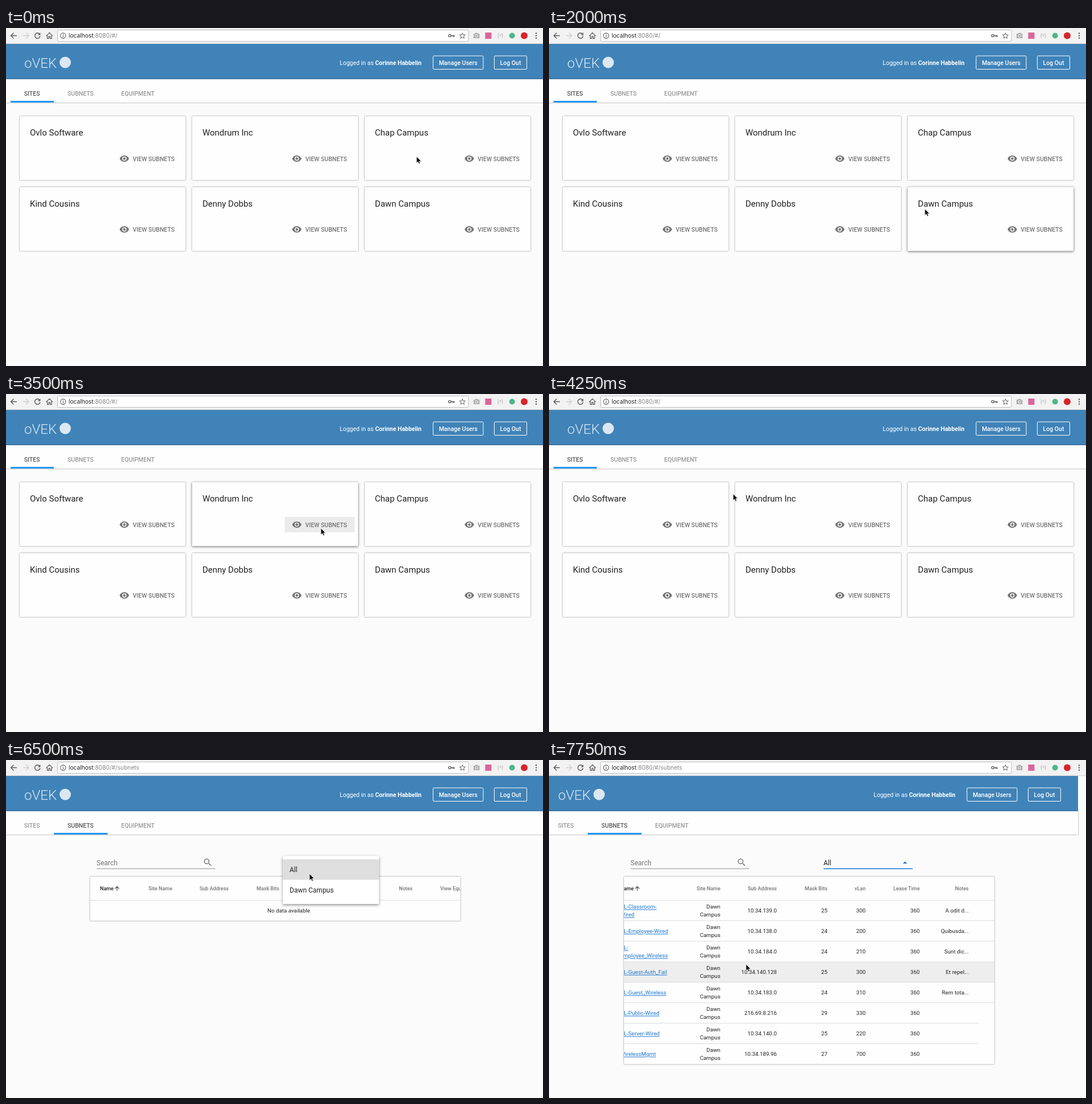
Write an HTML page that moves like this. It is 943 px wide and 594 px high and loops after 8000 ms.

```html
<!DOCTYPE html>
<html lang="en">
<head>
<meta charset="utf-8">
<title>Subnet manager</title>
<style>
  html, body { margin: 0; width: 100%; height: 100%; overflow: hidden; background: #fbfbfb; }
  svg { display: block; width: 943px; height: 594px; font-family: Roboto, sans-serif; }
  text { white-space: pre; }
  .url { font-family: Inter, sans-serif; }
  .mid { text-anchor: middle; }
  .end { text-anchor: end; }
  .med { font-weight: 500; }
  .dark { fill: #212121; }
  .grey { fill: #757575; }
  .white { fill: #fff; }
  .link { fill: #1976d2; text-decoration: underline; }
  .tab { fill: #999; font-weight: 500; }
  .tab.on { fill: #5a5a5a; }
  .tool { fill: none; stroke: #5a5a5a; stroke-width: 1.4; }
  .outline { fill: none; stroke: #fff; }
  .sheet { fill: #fefefe; filter: drop-shadow(0 .8px .8px rgba(0, 0, 0, .5)); }
  .up .sheet { filter: drop-shadow(0 1.3px 2.2px rgba(0, 0, 0, .6)); }
  .button { fill: none; }
  .button.on { fill: #ebebeb; }
  .row { fill: none; }
  .row.on { fill: #eee; }
  .option { fill: none; }
  .option.on { fill: #dedede; }
  #menu .sheet { fill: #fff; filter: drop-shadow(0 2px 2.4px rgba(0, 0, 0, .42)); }
  #field { fill: #757575; }
  #field line { stroke: #8c8c8c; }
  #field.set { fill: #1976d2; }
  #field.set text { fill: #212121; }
  #field.set line { stroke: #1976d2; stroke-width: 1.6; }
  #cursor { filter: drop-shadow(0 .6px .6px rgba(0, 0, 0, .35)); }
</style>
</head>
<body>
<svg id="stage" viewBox="0 0 943 594" xmlns="http://www.w3.org/2000/svg"></svg>
<script>
const LOOP = 8000, STEP = 250;
const EYE = 'M12 4.5C7 4.5 2.73 7.61 1 12c1.73 4.39 6 7.5 11 7.5s9.27-3.11 11-7.5c-1.73-4.39-6-7.5-11-7.5z' +
  'M12 17a5 5 0 1 1 0-10 5 5 0 0 1 0 10zm0-8a3 3 0 1 0 0 6 3 3 0 0 0 0-6z';
const LENS = 'M15.5 14h-.79l-.28-.27A6.5 6.5 0 1 0 13.73 14.43l.27.28v.79l5 4.99L20.49 19z' +
  'M9.5 14a4.5 4.5 0 1 1 0-9 4.5 4.5 0 0 1 0 9z';
const ARROW_UP = 'M4 12l1.41 1.41L11 7.83V20h2V7.83l5.58 5.59L20 12l-8-8-8 8z';

const sites = ['Ovlo Software', 'Wondrum Inc', 'Chap Campus', 'Kind Cousins', 'Denny Dobbs', 'Dawn Campus'];
const subnets = [
  ['CL-Classroom-|Wired', '10.34.139.0', 25, 300, 'A odit d...'],
  ['CL-Employee-Wired', '10.34.138.0', 24, 200, 'Quibusda...'],
  ['CL-|Employee_Wireless', '10.34.184.0', 24, 210, 'Sunt dic...'],
  ['CL-Guest-Auth_Fail', '10.34.140.128', 25, 300, 'Et repel...'],
  ['CL-Guest_Wireless', '10.34.183.0', 24, 310, 'Rem tota...'],
  ['CL-Public-Wired', '216.69.8.216', 29, 330, ''],
  ['CL-Server-Wired', '10.34.140.0', 25, 220, ''],
  ['WirelessMgmt', '10.34.189.96', 27, 700, '']
];
const heads = ['Site Name', 'Sub Address', 'Mask Bits', 'vLan', 'Lease Time', 'Notes'];
const emptyCols = [292, 391, 480, 547, 642, 714];
const dataCols = [341, 440, 529, 596, 691, 777];

// time, x, y of the pointer tip
const path = [
  [0, 721, 226], [500, 590, 222], [1000, 330, 250], [1250, 282, 262], [1500, 345, 305],
  [2000, 660, 318], [2500, 836, 246], [3000, 690, 232], [3250, 580, 235], [3500, 553, 236],
  [3750, 550, 235], [4500, 210, 146], [4750, 134, 119], [5000, 128, 118], [5250, 130, 120],
  [5750, 420, 250], [6000, 531, 184], [6500, 533, 200], [7000, 533, 200], [7500, 375, 340], [7750, 346, 359]
];

// Text whose capitals are centred on cy
const text = (x, cy, size, str, cls = '', rest = '') =>
  `<text x="${x}" y="${cy + size * .3555}" font-size="${size}" class="${cls}" ${rest}>${str}</text>`;
const rect = (x, y, w, h, rest = '') => `<rect x="${x}" y="${y}" width="${w}" height="${h}" ${rest}/>`;
const line = (x1, x2, y, rest = '') => `<line x1="${x1}" x2="${x2}" y1="${y}" y2="${y}" ${rest}/>`;
const icon = (d, x, y, k, cls) => `<path class="${cls}" fill-rule="evenodd" d="${d}" transform="translate(${x} ${y}) scale(${k})"/>`;
const lines = (x, cy, str, cls) => {
  const parts = str.split('|');
  return parts.map((p, i) => text(x, cy + 14 * i - 7 * (parts.length - 1), 9.75, p, cls)).join('');
};

const cardX = i => 24 + 302.9 * (i % 3);
const cardY = i => 155 + 124.4 * Math.floor(i / 3);

const toolbar = () => rect(0, 0, 943, 28, 'fill="#f2f2f2"') + line(0, 943, 27.5, 'stroke="#d4d4d4"') +
  rect(90.5, 3.5, 721.5, 20, 'rx="2" fill="#fff" stroke="#bdbdbd"') +
  `<g class="tool">
    <path d="M19 13.5H8.5M13.5 8.5l-5 5 5 5"/>
    <path d="M30 13.5h10M35 8.5l5 5-5 5" stroke="#d0d0d0"/>
    <path d="M59 10.6a4.7 4.7 0 1 0 .9 3.6"/><path d="M60.3 8v4.4h-4.4z" fill="#5a5a5a" stroke="none"/>
    <path d="M70.5 14.2L76.3 8.4l5.800 5.800M72.500 13v5.400h2.600v-3.600h2.400v3.600h2.600V13" stroke-width="1.200"/>
    <circle cx="100.300" cy="13.500" r="4.600" stroke-width="1.100"/>
    <path d="M100.300 12.700v3.300M100.300 10.700v1.200" stroke-width="1.200"/>
    <circle cx="779.300" cy="13.500" r="2.100"/><path d="M781.500 13.500h5.500v2.300M784.700 13.500v2" />
    <path d="M801.500 8.600l1.400 3.300 3.600.300-2.700 2.400.8 3.500-3.100-1.900-3.100 1.900.8-3.500-2.700-2.400 3.600-.300z" stroke-width="1"/>
  </g>
  <path d="M821 10h2.500l1-1.500h3.500l1 1.500h2.500v8H821z" fill="#b0b0b0"/>
  <circle cx="826.200" cy="13.900" r="2.300" fill="#b0b0b0" stroke="#f2f2f2"/>
  <rect x="841.500" y="8" width="11" height="11" fill="#d9659b"/>
  <circle cx="888.700" cy="13.500" r="5" fill="#4fb58a"/>
  <circle cx="910" cy="13.500" r="6" fill="#d8232a"/>
  <g fill="#5a5a5a"><circle cx="931" cy="9.300" r="1.200"/><circle cx="931" cy="13.500" r="1.200"/><circle cx="931" cy="17.700" r="1.200"/></g>` +
  text(868, 13.3, 8.5, '{=}', 'mid', 'fill="#aaa"') +
  text(110, 13.4, 10.2, 'localhost<tspan fill="#858585">:8080/#/<tspan id="route"></tspan></tspan>', 'url dark');

const header = () => rect(0, 28, 945, 62, 'fill="#4083b8"') +
  text(32, 61, 24, 'oVEK', '', 'fill="#dbe8f2" font-weight="300"') +
  '<circle cx="104" cy="60.500" r="10" fill="#dbe8f2"/>' +
  text(586, 61.5, 10.5, 'Logged in as <tspan font-weight="700">Corinne Habbelin</tspan>', 'white') +
  rect(750, 49, 88, 23.5, 'rx="1.5" class="outline"') + text(794, 61.5, 10.5, 'Manage Users', 'white med mid') +
  rect(857.5, 49, 57, 23.5, 'rx="1.5" class="outline"') + text(886, 61.5, 10.5, 'Log Out', 'white med mid');

const tabs = () => rect(0, 90, 945, 41, 'class="sheet"') +
  text(31.7, 115.3, 10.5, 'SITES', 'tab') + text(108, 115.3, 10.5, 'SUBNETS', 'tab') +
  text(202.3, 115.3, 10.5, 'EQUIPMENT', 'tab') + rect(8, 128, 76, 3, 'id="ink" fill="#2196f3"');

const card = (name, i) => {
  const x = cardX(i), y = cardY(i);
  return '<g class="card">' + rect(x, y, 291.3, 112.3, 'rx="1.5" class="sheet"') +
    rect(x + 162.5, y + 61, 123, 27, 'rx="1.5" class="button"') + text(x + 18, y + 29, 15, name, 'dark') +
    icon(EYE, x + 174.8, y + 65.5, .75, 'grey') + text(x + 198.5, y + 75, 10.5, 'VIEW SUBNETS', 'grey med') + '</g>';
};

const headRow = cols => text(165, 226, 9, 'Name', 'dark med') + icon(ARROW_UP, 189, 219.7, .5, 'dark') +
  heads.map((h, i) => text(cols[i], 226, 9, h, 'grey med end')).join('') +
  text(cols[5] + 48.5, 226, 9, 'View Equipment', 'grey med') + line(147, 900, 246.5, 'stroke="#dcdcdc"');

const dataRow = ([name, addr, mask, vlan, note], i) => {
  const y = 246.5 + 36 * i, cy = y + 18.5;
  const cells = [addr, mask, vlan, 360, note].map((c, k) => text(dataCols[k + 1], cy, 9.75, c, 'dark end')).join('');
  return rect(147, y, 753, 36, 'class="row"') + lines(165, cy, name, 'link') +
    lines(dataCols[0], cy, 'Dawn|Campus', 'dark end') + cells +
    (i < 7 ? line(147, i === 5 || i === 6 ? 795 : 900, y + 36, 'stroke="#dcdcdc"') : '');
};

const subnetView = () => text(159, 180.3, 12, 'Search', 'grey') + icon(LENS, 345.3, 171, .75, 'grey') +
  line(159, 367.5, 191, 'stroke="#8c8c8c"') +
  '<g id="field">' + text(498, 180.3, 12, 'Select') + line(498, 654.5, 191) + '<path/></g>' +
  rect(147.5, 205, 650.5, 77.5, 'id="table" rx="1.5" class="sheet"') +
  '<g clip-path="url(#inner)"><g id="empty">' + headRow(emptyCols) +
  text(496.5, 265, 9.75, 'No data available', 'dark mid') + '</g><g id="data">' +
  headRow(dataCols) + subnets.map(dataRow).join('') + '</g></g>' +
  '<g id="menu">' + rect(486, 168.5, 169, 84.5, 'rx="1.5" class="sheet"') +
  rect(486, 174.5, 169, 36, 'class="option"') + rect(486, 210.5, 169, 36, 'class="option"') +
  text(498, 192.7, 12, 'All', 'dark') + text(498, 229, 12, 'Dawn Campus', 'dark') + '</g>';

const stage = document.getElementById('stage');
stage.innerHTML = '<defs><clipPath id="inner">' + rect(147.5, 205, 650.5, 330) + '</clipPath></defs>' +
  '<g id="page">' + header() + tabs() + '<g id="sites">' + sites.map(card).join('') + '</g>' +
  '<g id="subnets">' + subnetView() + '</g></g>' + toolbar() +
  '<path id="cursor" d="M0 0V11.300l2.600-2.400 1.700 3.900 2-.9-1.700-3.700h3.500z" fill="#000" stroke="#fff" stroke-width=".8"/>';

const $ = id => document.getElementById(id);
const all = sel => [...stage.querySelectorAll(sel)];
const show = (id, on) => $(id).style.display = on ? '' : 'none';
const tabLabels = all('.tab'), cards = all('.card'), buttons = all('.button'), rows = all('.row'), options = all('.option');
const select = $('field').querySelector('text'), caret = $('field').querySelector('path');

function pointer(t) {
  const n = path.findIndex(p => p[0] > t);
  if (n < 0) return path[path.length - 1].slice(1);
  const [t0, x0, y0] = path[n - 1], [t1, x1, y1] = path[n], k = (t - t0) / (t1 - t0);
  return [x0 + (x1 - x0) * k, y0 + (y1 - y0) * k];
}

function draw(time) {
  const t = Math.floor(time / STEP) * STEP;
  const [px, py] = pointer(t);
  const over = (x, y, w, h) => t > 0 && px >= x && px < x + w && py >= y && py < y + h;
  const onSubnets = t >= 5000, loaded = t >= 7000;
  const shift = t >= 7500 ? -16 : 0, scroll = t >= 7750 ? -24 : 0;

  $('cursor').setAttribute('transform', `translate(${px} ${py})`);
  $('page').setAttribute('transform', `translate(${shift} 0)`);
  $('data').setAttribute('transform', `translate(${scroll} 0)`);
  $('route').textContent = onSubnets ? 'subnets' : '';
  show('sites', !onSubnets);
  show('subnets', onSubnets);
  show('empty', !loaded);
  show('data', loaded);
  show('menu', t >= 6250 && !loaded);

  const [inkX, inkW] = !onSubnets ? [8, 76] : t < 5250 ? [75, 92] : [84, 94.5];
  $('ink').setAttribute('x', inkX);
  $('ink').setAttribute('width', inkW);
  tabLabels.forEach((el, i) => el.classList.toggle('on', i === +onSubnets));

  cards.forEach((el, i) => {
    const x = cardX(i), y = cardY(i);
    el.classList.toggle('up', over(x, y, 291.3, 112.3));
    buttons[i].classList.toggle('on', over(x + 162.5, y + 61, 123, 27));
  });
  options.forEach((el, i) => el.classList.toggle('on', over(486, 174.5 + 36 * i, 169, 36)));
  rows.forEach((el, i) => el.classList.toggle('on', over(147.5 + shift, 246.5 + 36 * i, 650.5, 36)));

  $('table').setAttribute('height', loaded ? 329.5 : 77.5);
  $('field').classList.toggle('set', loaded);
  select.textContent = loaded ? 'All' : 'Select';
  caret.setAttribute('d', loaded ? 'M637.5 182h7.5l-3.75-3.75z' : 'M637.5 178.3h7.5l-3.75 3.75z');
}

let start;
function tick(now) {
  start ??= now;
  draw((now - start) % LOOP);
  requestAnimationFrame(tick);
}
draw(0);
requestAnimationFrame(tick);
</script>
</body>
</html>
```
